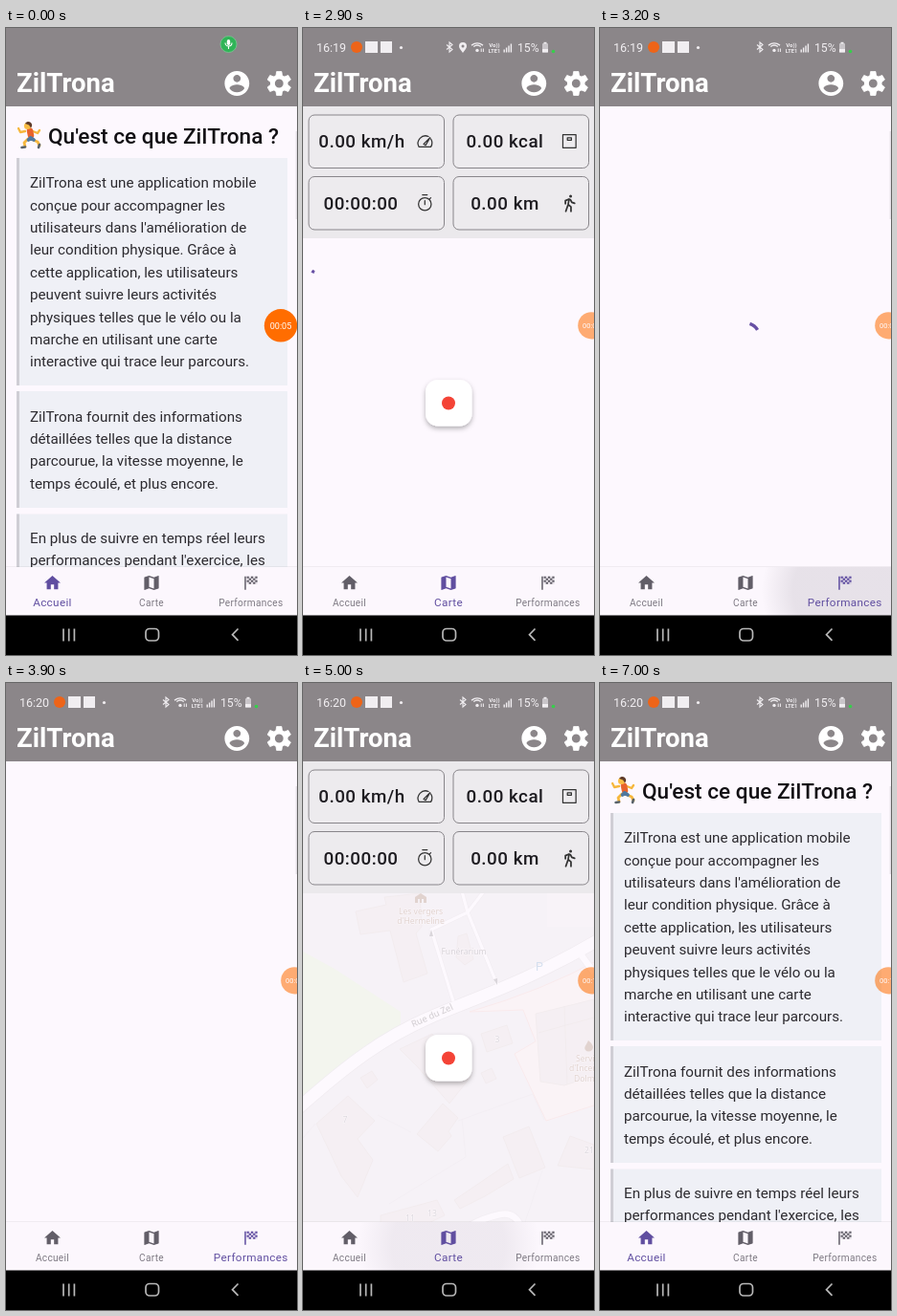
An HTML page that plays this animation: 304 px wide and 656 px high, repeating every 7200 ms.

```html
<!DOCTYPE html>
<html lang="fr">
<head>
<meta charset="utf-8">
<title>ZilTrona</title>
<style>
html, body { margin: 0; width: 100%; height: 100%; overflow: hidden; background: #fdf8fe; }
svg { display: block; width: 100vw; height: 100vh; font-family: Roboto, sans-serif; }
.mid { text-anchor: middle; }
.body { font-size: 15.2px; fill: #2c2a2f; }
.value { font-size: 18.8px; font-weight: 500; letter-spacing: .5px; fill: #1d1b20; }
.tab { text-anchor: middle; letter-spacing: .03em; }
.line { fill: none; stroke: #333; stroke-width: 1.5; stroke-linecap: round; stroke-linejoin: round; }
.house { fill: #d9d0c9; stroke: #c6b9ae; stroke-width: .8; }
.road { fill: none; stroke-linejoin: round; }
.place { text-anchor: middle; font: 8.6px "Noto Sans", sans-serif; paint-order: stroke; stroke: #f2efec; stroke-width: 1.2px; }
</style>
</head>
<body>
<svg id="stage" viewBox="0 0 304 656" preserveAspectRatio="none"></svg>
<script>
const LOOP = 7200;
const INK = [98, 94, 104], PURPLE = [96, 78, 160];
const stage = document.getElementById('stage');
const $ = id => document.getElementById(id);

const text = (x, y, s, attrs = '') => `<text x="${x}" y="${y}" ${attrs}>${s}</text>`;
const rect = (x, y, w, h, fill, attrs = '') =>
  `<rect x="${x}" y="${y}" width="${w}" height="${h}" fill="${fill}" ${attrs}/>`;
const circle = (x, y, r, fill, attrs = '') => `<circle cx="${x}" cy="${y}" r="${r}" fill="${fill}" ${attrs}/>`;
const path = (d, attrs = '') => `<path d="${d}" ${attrs}/>`;
const group = (id, inner, attrs = '') => `<g id="${id}" ${attrs}>${inner}</g>`;
const icon = (x, y, size, inner, attrs = '') =>
  `<g transform="translate(${x - size / 2} ${y - size / 2}) scale(${size / 24})" ${attrs}>${inner}</g>`;

// Icons on a 24 unit grid
const gear = circle(12, 12, 5.5, 'none', 'stroke="#fff" stroke-width="3.9"') +
  [...Array(6)].map((_, i) =>
    path('M9.9 2h4.2l.7 4.5h-5.6z', `fill="#fff" stroke="#fff" stroke-width=".6" transform="rotate(${i * 60} 12 12)"`)).join('');
const account = path('M12 2C6.48 2 2 6.48 2 12s4.48 10 10 10 10-4.48 10-10S17.52 2 12 2zm0 3c1.66 0 3 1.34 3 3s-1.34 3-3 3-3-1.34-3-3 1.34-3 3-3zm0 14.2c-2.5 0-4.71-1.28-6-3.22.03-1.99 4-3.08 6-3.08 1.99 0 5.97 1.09 6 3.08-1.29 1.94-3.5 3.22-6 3.22z', 'fill="#fff"');
const home = path('M10 20v-6h4v6h5v-8h3L12 3 2 12h3v8z');
const mapIcon = path('M20.5 3L15 5.1 9 3 3.4 4.9 3 5.4V20.5l.5.5L9 18.9l6 2.1 5.6-1.9.4-.5V3.5zM15 19l-6-2.1V5l6 2.1z');
const checks = [...Array(20)].map((_, i) => {
  const col = i % 5, row = i / 5 | 0;
  return (col + row) % 2 ? '' : `M${7 + col * 2.6} ${4 + row * 2.4}h2.6v2.4h-2.6z`;
}).join('');
const flag = path('M4.2 4h1.8v16.5H4.2z') + path(checks) + path('M7 4h13v9.6H7z', 'opacity=".15"');
const gauge = path('M4.5 19a9.4 9.4 0 0 1 12-13M19.5 9a9.4 9.4 0 0 1 0 10H4.5M10.5 15.5l8-8-5.5 9.5z');
const scale = path('M3.8 3.8h16.4v16.4H3.8zM9.5 7.5h5v3h-5z');
const timer = circle(12, 13.5, 8, 'none') + path('M9 1.8h6M12 9v5M18 7l1.5-1.5');
const walker = circle(13.5, 3.6, 1.8, '#333', 'stroke="none"') +
  path('M7 13V9.2l4.5-2 2 1 1.5 3 3.5 1.3M11.5 8l-1.2 6.3L7.5 22.5M10.5 14l3.5 3v5.5', 'stroke-width="2.1"');

function statusBar() {
  const w = '#f1eef1';
  const bt = path('M-3 -2.5L3 2.5 0 5V-5L3 -2.5 -3 2.5', `fill="none" stroke="${w}" stroke-width="1.1"`);
  const arcs = [6, 3.8].map(r => path(`M${-r} ${-r * .65 + 2}Q0 ${-r * 1.2 + 1} ${r} ${-r * .65 + 2}`,
    `fill="none" stroke="${w}" stroke-width="1.3"`)).join('');
  return text(14, 24.5, '', `id="clock" font-size="12.5" fill="${w}"`) +
    circle(56, 20, 6, '#ee6418') + rect(65, 14, 13, 12, w) + rect(81, 14, 12, 12, w) + circle(102.5, 20.5, 1.6, w) +
    group('bt', bt) +
    group('pin', path('M167 26c-2.5-3.5-4-5-4-7a4 4 0 0 1 8 0c0 2-1.5 3.5-4 7z', `fill="${w}"`) + circle(167, 19, 1.5, '#8b8689')) +
    `<g transform="translate(182 20)">${arcs}${circle(0, 3.4, 1.7, w)}${path('M4.2 1.5v3.5M6.4 1.5v3.5', `stroke="${w}"`)}</g>` +
    text(200, 19.5, 'Vo))', `class="mid" font-size="6" font-weight="700" fill="${w}"`) +
    text(200, 25.5, 'LTE1', `class="mid" font-size="5.6" font-weight="700" fill="${w}"`) +
    [0, 1, 2, 3].map(i => rect(209.5 + i * 2.4, 22.5 - i * 2, 1.4, 3 + i * 2, w)).join('') +
    text(224, 24.5, '15%', `font-size="12.2" fill="${w}"`) +
    rect(250, 16, 6, 9.5, '#c9c5c9', 'rx="1"') + rect(251.5, 14.8, 3, 1.6, w) + rect(250, 22, 6, 3.5, w);
}

function runner() {
  const limb = (d, color, w) => path(d, `fill="none" stroke="${color}" stroke-width="${w}" stroke-linecap="round" stroke-linejoin="round"`);
  return limb('M28 117l5 2 2 4', '#f6b73c', 2.8) + limb('M23 116l-4 4 1 4', '#f6b73c', 2.8) +
    limb('M35 122l-1 3M20 124.5l-3.5 .5', '#59636b', 2.6) +
    limb('M28 108l5 2 2-3M20 108l-5 1-2-4', '#f6b73c', 2.3) +
    limb('M25 107.5l1 5', '#e8622c', 6.5) + limb('M26 115l3 2M25.5 115l-2 2', '#5078a0', 3.8) +
    circle(22.5, 102.5, 3.6, '#f9bd45') + path('M20 100a3.8 3.8 0 1 1 6 4.5l-2-3z', 'fill="#5e3b2a"');
}

function homePage() {
  const cards = [
    [136, 238, 167.2, ['ZilTrona est une application mobile', 'conçue pour accompagner les', "utilisateurs dans l'amélioration de",
      'leur condition physique. Grâce à', 'cette application, les utilisateurs', 'peuvent suivre leurs activités',
      'physiques telles que le vélo ou la', 'marche en utilisant une carte', 'interactive qui trace leur parcours.']],
    [380, 122, 411.5, ['ZilTrona fournit des informations', 'détaillées telles que la distance', 'parcourue, la vitesse moyenne, le', 'temps écoulé, et plus encore.']],
    [508.5, 80, 539, ['En plus de suivre en temps réel leurs', "performances pendant l'exercice, les"]]
  ];
  return runner() + text(44, 121, "Qu'est ce que ZilTrona ?", 'font-size="22.6" font-weight="500" fill="#121014"') +
    cards.map(([y, h, base, lines]) => rect(11, y, 283, h, '#eff0f6') + rect(11, y, 3, h, '#cfced5') +
      lines.map((s, i) => text(25, base + i * 23.4, s, 'class="body"')).join('')).join('');
}

function cityMap() {
  const houses = [
    '55,239 87,232 85,224 122,220 124,255 118,262 130,304 105,313 91,259 60,263',
    '162,265 171,262 178,289 169,295 160,287', '186,367 213,358 219,377 192,386',
    '101,383 135,367 175,412 153,440 120,402', '146,440 162,455 152,469 155,474 141,490 119,472',
    '60,413 72,406 78,415 67,424', '14,461 47,432 75,458 57,477 73,499 57,538 40,516',
    '209,475 236,464 253,507 226,518', '158,541 214,503 220,519 190,537 164,550',
    '279,474 304,483 304,509 266,505', '81,557 140,541 148,557 125,568 81,568', '186,408 197,403 202,414 191,419'
  ].map(p => `<polygon points="${p}" class="house"/>`).join('');
  const main = 'M-5 445C50 396 85 371 130 351S230 315 310 268';
  const lanes = ['M157 333L134 258 172 240 192 214M172 240L203 316M165 214L172 240', 'M304 303L288 281', 'M172 569Q190 559 206 556T228 570'];
  const stroke = (d, color, w) => path(d, `class="road" stroke="${color}" stroke-width="${w}"`);
  const place = (x, y, s, fill, extra = '') => text(x, y, s, `class="place" fill="${fill}" ${extra}`);
  const brown = '#78481c';
  return rect(0, 220, 304, 344, '#dfdcdf') +
    path('M0 281L33 299 102 344V364Q50 392 0 441z', 'fill="#cdebb3"') +
    stroke('M0 476L13 461M78 452L113 470M162 458L240 430 252 457M166 456L170 496 90 545M250 510L232 564', '#cbc9ca', .8) +
    path('M174 344Q250 322 310 289V440L254 458 221 388 243 375 230 342z', 'fill="#f3e4da" stroke="#ebb7aa"') +
    houses + '<polygon points="243,346 304,331 304,411 273,421 248,417" class="house"/>' + stroke('M246 366L304 350M273 338L276 420', '#c6b9ae', .8) +
    lanes.map((d, i) => stroke(d, '#c9c8c8', i ? 8 : 4.5)).join('') + stroke(main, '#bfbdbd', 14) +
    lanes.map((d, i) => stroke(d, '#fff', i ? 6.5 : 3.2)).join('') + stroke(main, '#fff', 12.4) +
    path('M134 258l-2 7h4zM203 316l-4-6 4-1z', 'fill="#555"') +
    path('M117 224l6-4 6 4v6h-3v-4h-2v4h-2v-4h-2v4h-3z', `fill="${brown}"`) +
    place(123, 242, 'Les vergers', brown) + place(123, 252, "d'Hermeline", brown) +
    place(168, 283.5, 'Funérarium', '#4a4a4a') +
    text(247, 301, 'P', 'class="mid" font-size="12.5" fill="#3c82b5"') +
    place(135, 351, 'Rue du Zel', '#333', 'transform="rotate(-24 135 348)" style="font-size:9.4px"') +
    [[203, 376, 3], [44, 460, 7], [112, 563, 11], [135, 558, 13], [299, 492, 21]].map(p => place(...p, '#666')).join('') +
    path('M298 374c5 4 6 7 4 10q-4 3-7 0c-2-3 1-5 3-10z', `fill="${brown}"`) +
    ['Service', "d'Incendie", 'Dolmes'].map((s, i) =>
      place([285, 278, 283][i], 396 + i * 10.3, s, brown, 'style="text-anchor:start"')).join('');
}

function trackPage() {
  const cell = (x, y, mid, s, ic) => rect(x, y, 141.5, 55.5, '#edebee', 'rx="6" stroke="#88858a"') +
    text(mid, y + 34, s, 'class="value mid"') + icon(x + 121.3, y + 27.5, 20, ic, 'class="line"');
  return group('map', cityMap()) + rect(0, 82, 304, 138, '#ebe9ec') +
    cell(6, 91, 61.5, '0.00 km/h', gauge) + cell(157, 91, 211, '0.00 kcal', scale) +
    cell(6, 155.5, 60.5, '00:00:00', timer) + cell(157, 155.5, 211, '0.00 km', walker) +
    rect(128, 368, 48.5, 48.5, '#fff', 'rx="13" filter="url(#shadow)"') + circle(152, 392.5, 7, '#f44336');
}

const TABS = [[48.5, 'Accueil', home], [152, 'Carte', mapIcon], [255.8, 'Performances', flag]];
const navBar = () => rect(0, 564, 304, 51, '#fcf7fd') + rect(0, 563, 304, 1, '#000', 'opacity=".05"') +
  '<g clip-path="url(#navClip)"><circle id="ripple" cy="589" fill="url(#ink)"/></g>' +
  TABS.map(([x, label, ic], i) => group('tab' + i, icon(x, 580.5, 20.3, ic, 'fill-rule="evenodd"') +
    text(x, 604.5, label, 'class="tab"'))).join('');

const systemBar = () => rect(0, 614.5, 304, 42, '#000') +
  path('M60 628.5v13M65.7 628.5v13M71.4 628.5v13', 'stroke="#b8b8b8" stroke-width="1.7"') +
  rect(146, 628.5, 13.5, 12.5, 'none', 'rx="4" stroke="#b8b8b8" stroke-width="1.7"') +
  path('M242.5 628.5l-6 6.2 6 6.2', 'fill="none" stroke="#b8b8b8" stroke-width="1.7"');

const micPill = () => circle(0, 0, 8.5, '#2fb457', 'stroke="#7cc792" stroke-width=".8"') +
  rect(-1.7, -5, 3.4, 6, '#fff', 'rx="1.7"') +
  path('M-3.5 -1.5a3.5 3.5 0 0 0 7 0M0 2v3', 'fill="none" stroke="#fff" stroke-width="1.1"');

stage.innerHTML = `<defs>
  <clipPath id="navClip"><rect y="564" width="304" height="51"/></clipPath>
  <radialGradient id="ink"><stop offset=".62" stop-color="#3c3446" stop-opacity=".11"/><stop offset="1" stop-color="#3c3446" stop-opacity="0"/></radialGradient>
  <filter id="shadow" x="-30%" y="-30%" width="160%" height="170%"><feDropShadow dx="0" dy="2.5" stdDeviation="2.4" flood-opacity=".3"/></filter>
  </defs>` + rect(0, 0, 304, 656, '#fdf8fe') +
  group('page0', homePage()) + group('page1', trackPage()) +
  group('scroll', rect(302.6, 108, 1.4, 92, '#e6e1e8')) +
  path('', 'id="spin" fill="none" stroke="#6750a4" stroke-width="3.4"') +
  rect(0, 0, 304, 82, '#8b8689') + group('status', statusBar()) +
  circle(261.5, 24.5, 1.8, '#35d04a', 'id="dot"') + group('mic', micPill()) +
  text(11, 67.3, 'ZilTrona', 'font-size="27.5" font-weight="700" fill="#fff"') +
  icon(241.3, 58, 31, account) + icon(285.3, 58, 30, gear) +
  navBar() + systemBar() +
  group('bubble', circle(0, 0, 17.2, '#ff6d00') + text(0, 3.3, '', 'id="rec" class="mid" font-size="9.1" fill="#fff"'));

const TAPS = [[1200, 1], [2900, 2], [4550, 1], [6270, 0]];
const clamp = v => Math.max(0, Math.min(1, v));
const ramp = (t, a, b) => clamp((t - a) / (b - a));
const ease = v => v * v * (3 - 2 * v);
const mix = (a, b, k) => a + (b - a) * k;
const show = (id, on) => $(id).setAttribute('display', on ? 'inline' : 'none');
const set = (id, name, v) => $(id).setAttribute(name, v);

function spinner(cx, cy, dt, turn) {
  const p = dt / 1333 % 1, r = 14.4;
  const sweep = v => ease(ease(clamp(v)));
  const head = sweep(p * 2), tail = sweep(p * 2 - 1);
  const a = (turn - 90 + tail * 270 + p * 120) * Math.PI / 180;
  const b = a + ((head - tail) * 250 + 12) * Math.PI / 180;
  const at = v => `${cx + r * Math.cos(v)} ${cy + r * Math.sin(v)}`;
  return `M${at(a)}A${r} ${r} 0 ${b - a > Math.PI ? 1 : 0} 1 ${at(b)}`;
}

function draw(t) {
  let page = 0, last = null;
  const picked = [1, 0, 0];
  for (const tap of TAPS) {
    const [start, tab] = tap;
    if (t < start) break;
    last = tap;
    if (t >= start + 100) page = tab;
    const k = ramp(t, start + 100, start + 300);
    picked.forEach((v, i) => picked[i] = mix(v, i === tab ? 1 : 0, k));
  }
  show('page0', page === 0);
  show('page1', page === 1);
  show('scroll', page !== 1);
  set('map', 'opacity', ramp(t, 4950, 5200));

  picked.forEach((k, i) => {
    const tab = $('tab' + i);
    tab.setAttribute('fill', `rgb(${INK.map((c, j) => Math.round(mix(c, PURPLE[j], k)))})`);
    tab.lastChild.setAttribute('font-size', mix(10.1, 11.7, k));
    tab.lastChild.setAttribute('opacity', mix(.82, 1, k));
  });

  const dt = last ? t - last[0] : 1e4;
  set('ripple', 'cx', last ? TABS[last[1]][0] : 0);
  set('ripple', 'r', Math.min(95, 42 + dt * .15));
  set('ripple', 'opacity', ramp(dt, 30, 150) * (1 - ramp(dt, 350, 620)));

  const mapWait = t >= 1540 && t < 3000, listWait = t >= 3000 && t < 3500;
  show('spin', mapWait || listWait);
  if (mapWait) set('spin', 'd', spinner(17, 242, t - 1540, 198));
  if (listWait) set('spin', 'd', spinner(152, 323, t - 3000, 0));

  set('status', 'opacity', ramp(t, 1450, 1650));
  $('clock').textContent = t < 3900 ? '16:19' : '16:20';
  show('pin', t < 3000);
  set('bt', 'transform', `translate(${t < 3000 ? 153 : 167} 20)`);
  show('dot', t >= 1300);
  const slide = ramp(t, 1200, 1400);
  set('mic', 'transform', `translate(${mix(232.5, 297, slide)} 17)`);
  set('mic', 'opacity', mix(1, .25, slide) * (1 - ramp(t, 1400, 1500)));

  const dock = ramp(t, 1200, 1520);
  set('bubble', 'transform', `translate(${mix(287, 301.3, dock)} 311.3) scale(${mix(1, .82, dock)})`);
  set('bubble', 'opacity', mix(1, .55, ramp(t, 1200, 1350)));
  const sec = [900, 1900, 2800, 3700, 4600, 5300, 6000, 7000].reduce((n, at) => n + (t >= at), 5);
  $('rec').textContent = '00:' + String(sec).padStart(2, '0');
}

const begin = performance.now();
function tick() {
  draw((performance.now() - begin) % LOOP);
  requestAnimationFrame(tick);
}
tick();
</script>
</body>
</html>
```
